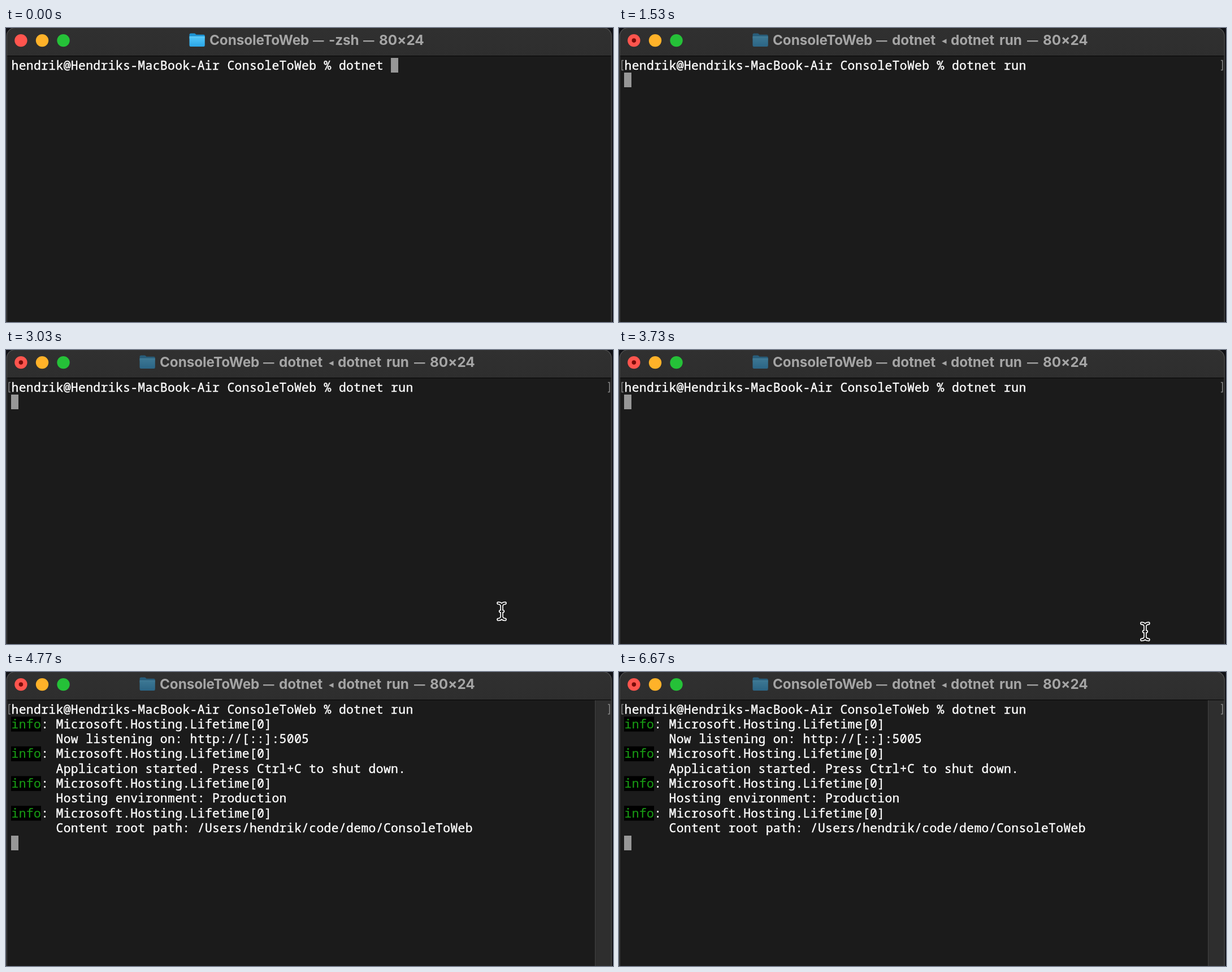
An HTML page that plays this animation: 1074x521 px, repeating every 6710 ms.

```html
<!DOCTYPE html>
<html lang="en">
<head>
<meta charset="utf-8">
<title>Terminal</title>
<style>
  html, body { margin: 0; width: 100%; height: 100%; overflow: hidden; background: #101116; }
  svg { display: block; width: 1074px; height: 521px; }
  text { white-space: pre; }
  .title { font: 700 24.3px Inter, "Open Sans", sans-serif; letter-spacing: -.1px; fill: #a5a5a5; }
  .title .dash { font-size: 19.5px; }
  .title .small { font: 17px "DejaVu Sans", sans-serif; }
  .mono {
    font: 500 21.3px "Noto Sans Mono", "DejaVu Sans Mono", monospace; letter-spacing: .39px;
    fill: #fff; stroke: #fff; stroke-width: .4px;
  }
  .mono .info { fill: #189a14; stroke: #189a14; stroke-width: .2px; }
</style>
</head>
<body>
<svg viewBox="0 0 1074 521" xmlns="http://www.w3.org/2000/svg">
  <defs>
    <linearGradient id="bar" x1="0" y1="0" x2="0" y2="1">
      <stop offset="0" stop-color="#303030"/><stop offset="1" stop-color="#2e2e2e"/>
    </linearGradient>
    <linearGradient id="blue" x1="0" y1="0" x2="0" y2="1">
      <stop offset="0" stop-color="#55c8fa"/><stop offset="1" stop-color="#2aa5e6"/>
    </linearGradient>
    <linearGradient id="dim" x1="0" y1="0" x2="0" y2="1">
      <stop offset="0" stop-color="#3d7894"/><stop offset="1" stop-color="#2b6585"/>
    </linearGradient>
    <clipPath id="frame"><rect x="1" y="-1" width="1071" height="560" rx="15"/></clipPath>
    <path id="ibeam" d="M-6-14.5Q-1-14.5 0-10Q1-14.5 6-14.5M0-10V10M-6 14.5Q-1 14.5 0 10Q1 14.5 6 14.5M-2.4 0H2.4"/>
  </defs>
  <g clip-path="url(#frame)">
    <rect width="1074" height="521" fill="#1b1b1b"/>
    <rect width="1074" height="49" fill="url(#bar)"/>
    <rect y="49" width="1074" height="1" fill="#060606"/>
    <g id="scroll">
      <rect x="1042" y="50" width="30" height="471" fill="#2e2e2e"/>
      <rect x="1042" y="50" width="1" height="471" fill="#424242"/>
    </g>
  </g>
  <rect x="1.25" y="-.5" width="1070" height="560" rx="15" fill="none" stroke="#515151" stroke-width="1.2"/>
  <circle cx="26.4" cy="22.1" r="11.2" fill="#ff554e"/>
  <circle id="busy" cx="26.4" cy="22.1" r="3.8" fill="#790b08"/>
  <circle cx="64" cy="22.1" r="11.2" fill="#ffb229"/>
  <circle cx="101.5" cy="22.1" r="11.2" fill="#25c138"/>
  <g id="titles"></g>
  <g id="marks">
    <path d="M8 57.5H5.2V74.5H8M1065 57.5H1067.8V74.5H1065" fill="none" stroke="#858585" stroke-width="1.6"/>
  </g>
  <text class="mono" id="prompt" x="9.5" y="73.5"></text>
  <g id="output"></g>
  <rect id="caret" width="13" height="26" fill="#979797"/>
  <g id="mouse" fill="none" stroke-linecap="round" stroke-linejoin="round">
    <use href="#ibeam" stroke="#fff" stroke-width="5.6"/>
    <use href="#ibeam" stroke="#161616" stroke-width="2.3"/>
  </g>
</svg>
<script>
const LOOP = 6710, LEFT = 9.5, TOP = 52.8, COL = 13.17, ROW = 26.33;
const $ = id => document.getElementById(id);
const PROMPT = 'hendrik@Hendriks-MacBook-Air ConsoleToWeb % dotnet ';
const LOG = [
  'Now listening on: http://[::]:5005',
  'Application started. Press Ctrl+C to shut down.',
  'Hosting environment: Production',
  'Content root path: /Users/hendrik/code/demo/ConsoleToWeb'
];

// Titles as [word, offset from the first word]
const TITLES = [
  { x: 361, words: [['ConsoleToWeb', 0], ['—', 183], ['-zsh', 211], ['—', 272], ['80×24', 300]] },
  { x: 325.5, words: [['ConsoleToWeb', 0], ['—', 183], ['dotnet', 211], ['run', 297], ['—', 345], ['80×24', 373]] },
  { x: 273, words: [['ConsoleToWeb', 0], ['—', 183], ['dotnet', 211], ['◂', 299], ['dotnet', 315], ['run', 401], ['—', 450], ['80×24', 478]] }
];
const TITLE_STEPS = [[0, 0], [600, 1], [1030, 2], [4200, 1], [4600, 2]];
const TYPED = [[0, ''], [130, 'r'], [230, 'ru'], [330, 'run']];
const ENTER = 560, SCROLL = 3850, PRINT = 4650;

// Pointer path as [time, x, y]
const PATH = [
  [1600, 698, 400], [1780, 672, 318], [2000, 645, 272], [2300, 652, 280],
  [2800, 761, 378], [3030, 877, 463], [3250, 894, 471], [3560, 894, 471],
  [3750, 935, 502], [3900, 985, 545]
];

// Class and baseline of title words that are symbols
const SYMBOLS = { '—': ['dash', 28.5], '◂': ['small', 28] };

function folder(x, on) {
  const back = on ? '#1d93d3' : '#285d7a', fill = on ? 'blue' : 'dim', edge = on ? '#74d4fc' : '#4b86a1';
  return `<g transform="translate(${x} 9)">
    <path d="M0 3Q0 .5 2.5 .5H8.5Q10 .5 11 1.7L12 2.8H25Q27.3 2.8 27.3 5V10H0Z" fill="${back}"/>
    <path d="M0 6H27.3V21.5Q27.3 24 25 24H2.3Q0 24 0 21.5Z" fill="url(#${fill})"/>
    <path d="M.3 6.3H27" stroke="${edge}" stroke-width=".8"/></g>`;
}

function title({ x, words }, i) {
  const spans = words.map(([word, dx]) => {
    const [kind, y] = SYMBOLS[word] || ['word', 30];
    return `<tspan class="${kind}" x="${x + dx - 1}" y="${y}">${word}</tspan>`;
  }).join('');
  return `<g>${folder(x - 36.5, i === 0)}<text class="title">${spans}</text></g>`;
}

function logEntry(line, i) {
  const y = TOP + (1 + 2 * i) * ROW, base = y + 20.7;
  return `<rect x="9" y="${y}" width="53" height="${ROW}" fill="#000"/>
    <text class="mono" x="${LEFT}" y="${base}"><tspan class="info">info</tspan>: Microsoft.Hosting.Lifetime[0]</text>
    <text class="mono" x="${LEFT + 6 * COL}" y="${base + ROW}">${line}</text>`;
}

$('titles').innerHTML = TITLES.map(title).join('');
$('output').innerHTML = LOG.map(logEntry).join('');
const titleGroups = [...$('titles').children];

const stepAt = (steps, t) => steps.filter(s => s[0] <= t).pop()[1];
const show = (el, on) => el.setAttribute('visibility', on ? 'visible' : 'hidden');

function pointerAt(t) {
  const i = PATH.findIndex(p => p[0] > t);
  if (i < 1) return null;
  const [t0, x0, y0] = PATH[i - 1], [t1, x1, y1] = PATH[i];
  const k = (t - t0) / (t1 - t0);
  return [x0 + (x1 - x0) * k, y0 + (y1 - y0) * k];
}

function draw(t) {
  const current = stepAt(TITLE_STEPS, t), typed = stepAt(TYPED, t);
  titleGroups.forEach((g, i) => show(g, i === current));
  show($('busy'), current > 0);
  show($('marks'), t >= ENTER);
  show($('scroll'), t >= SCROLL);
  show($('output'), t >= PRINT);
  $('prompt').textContent = PROMPT + typed;

  const row = t >= PRINT ? 9 : t >= ENTER ? 1 : 0;
  const col = row ? 0 : PROMPT.length + typed.length;
  $('caret').setAttribute('x', Math.floor(LEFT + col * COL));
  $('caret').setAttribute('y', Math.round(TOP + row * ROW));

  const pos = pointerAt(t);
  show($('mouse'), pos);
  if (pos) $('mouse').setAttribute('transform', `translate(${pos})`);
}

const start = performance.now();
function tick() {
  draw((performance.now() - start) % LOOP);
  requestAnimationFrame(tick);
}
tick();
</script>
</body>
</html>
```
